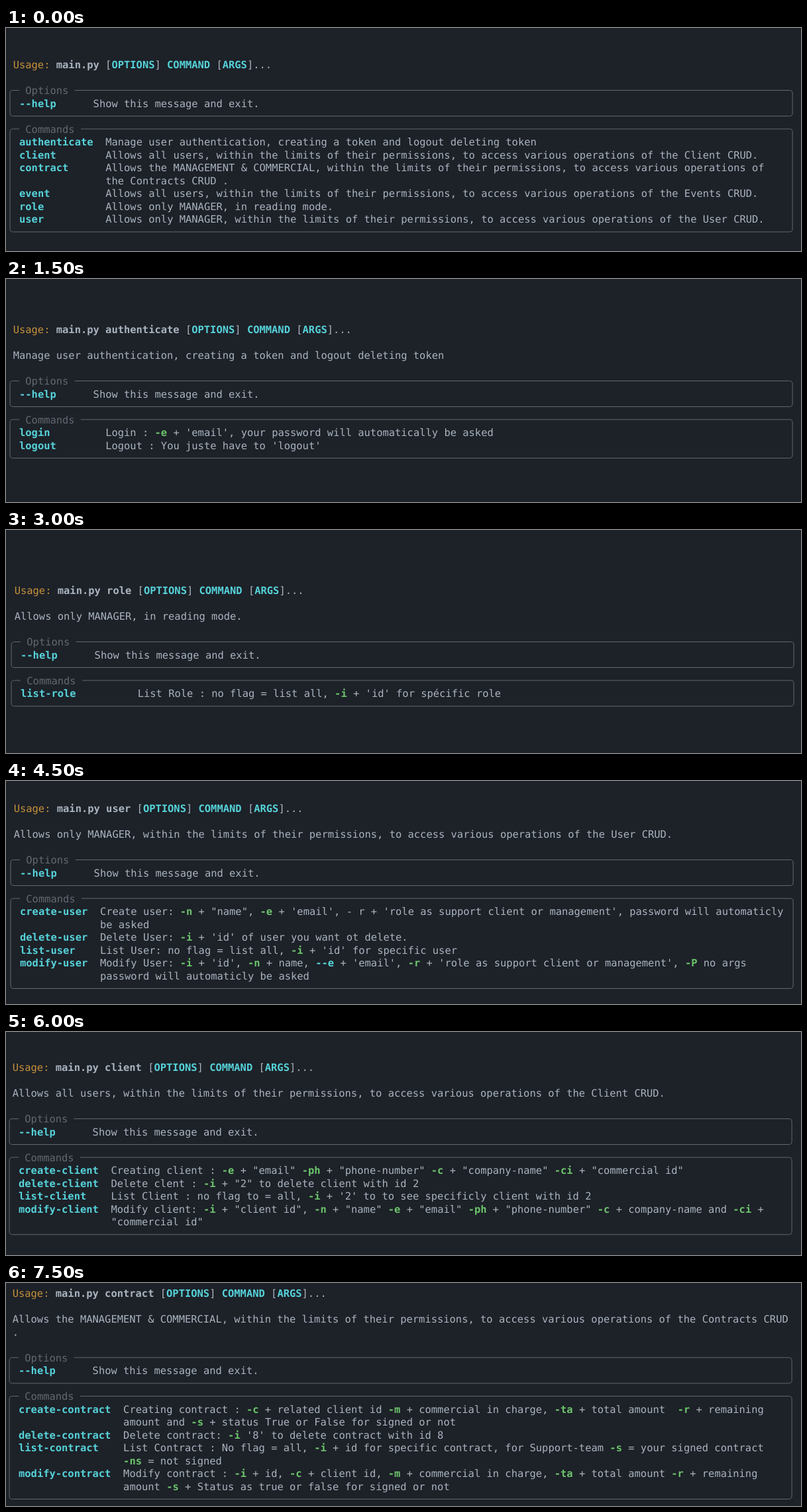
Animation of 1200 by 338 pixels, one loop 8000 ms. Source, as an HTML page:

```html
<!DOCTYPE html>
<html lang="en">
<head>
<meta charset="utf-8">
<title>Command line help</title>
<style>
html, body { margin: 0; height: 100%; overflow: hidden; background: #1d2128; }
svg { display: block; }
text { font: 15.448px "DejaVu Sans Mono", monospace; fill: #a9b4bf; white-space: pre; text-rendering: geometricPrecision; }
path { fill: none; stroke: #626971; }
.bold, .cyan, .green { font-weight: bold; }
.cyan { fill: #56d2d9; }
.green { fill: #6cc46c; }
.amber { fill: #c5913a; }
.dim { fill: #626971; }
</style>
</head>
<body>
<svg id="stage" width="1200" height="338"></svg>
<script>
const CELL = 9.3, ROW = 19.5, COLS = 127, STEP = 1500, LOOP = 8000;
const OPTIONS = [['--help', 'Show this message and exit.']];
const limits = 'within the limits of their permissions, to access various operations of';

// x, y: left edge of column 0 and middle of row 0; col: column of the descriptions
const scenes = [
  { x: 1.4, y: 56, cmd: 'main.py', about: [], col: 16, list: [
    ['authenticate', 'Manage user authentication, creating a token and logout deleting token'],
    ['client', `Allows all users, ${limits} the Client CRUD.`],
    ['contract', `Allows the MANAGEMENT & COMMERCIAL, ${limits}`, 'the Contracts CRUD .'],
    ['event', `Allows all users, ${limits} the Events CRUD.`],
    ['role', 'Allows only MANAGER, in reading mode.'],
    ['user', `Allows only MANAGER, ${limits} the User CRUD.`]] },
  { x: 1.4, y: 77, cmd: 'main.py authenticate', col: 16,
    about: ['Manage user authentication, creating a token and logout deleting token'], list: [
    ['login', "Login : -e + 'email', your password will automatically be asked"],
    ['logout', "Logout : You juste have to 'logout'"]] },
  { x: 3.4, y: 92, cmd: 'main.py role', col: 21,
    about: ['Allows only MANAGER, in reading mode.'], list: [
    ['list-role', "List Role : no flag = list all, -i + 'id' for spécific role"]] },
  { x: 2.4, y: 42, cmd: 'main.py user', col: 15,
    about: [`Allows only MANAGER, ${limits} the User CRUD.`], list: [
    ['create-user', `Create user: -n + "name", -e + 'email', - r + 'role as support client or management', password will automaticly`, 'be asked'],
    ['delete-user', "Delete User: -i + 'id' of user you want ot delete."],
    ['list-user', "List User: no flag = list all, -i + 'id' for specific user"],
    ['modify-user', "Modify User: -i + 'id', -n + name, --e + 'email', -r + 'role as support client or management', -P no args", 'password will automaticly be asked']] },
  { x: 0.4, y: 54, cmd: 'main.py client', col: 17,
    about: [`Allows all users, ${limits} the Client CRUD.`], list: [
    ['create-client', 'Creating client : -e + "email" -ph + "phone-number" -c + "company-name" -ci + "commercial id"'],
    ['delete-client', 'Delete clent : -i + "2" to delete client with id 2'],
    ['list-client', "List Client : no flag to = all, -i + '2' to to see specificly client with id 2"],
    ['modify-client', 'Modify client: -i + "client id", -n + "name" -e + "email" -ph + "phone-number" -c + company-name and -ci +', '"commercial id"']] },
  { x: 0.4, y: 16, cmd: 'main.py contract', col: 19,
    about: [`Allows the MANAGEMENT & COMMERCIAL, ${limits} the Contracts CRUD`, '.'], list: [
    ['create-contract', 'Creating contract : -c + related client id -m + commercial in charge, -ta + total amount  -r + remaining', 'amount and -s + status True or False for signed or not'],
    ['delete-contract', "Delete contract: -i '8' to delete contract with id 8"],
    ['list-contract', 'List Contract : No flag = all, -i + id for specific contract, for Support-team -s = your signed contract', '-ns = not signed'],
    ['modify-contract', 'Modify contract : -i + id, -c + client id, -m + commercial in charge, -ta + total amount -r + remaining', 'amount -s + Status as true or false for signed or not']] }
];

const span = (style, s) => `<tspan class="${style}">${s}</tspan>`;
const paintFlags = s => s.replace('&', '&amp;').replace(/(^|\s)(--?[a-z]+)/gi,
  (_, gap, flag) => gap + span(flag.startsWith('--') ? 'cyan' : 'green', flag));

function draw({ x, y, cmd, about, col, list }) {
  let out = '', row = 0;
  const px = c => x + c * CELL;
  const line = r => y + r * ROW - 0.5;
  const put = (c, r, s) => out += `<text x="${px(c)}" y="${y + r * ROW + 5}">${s}</text>`;

  function panel(title, items, descCol) {
    const top = line(row), left = px(0.5), right = px(COLS + 0.5), k = 4.5;
    put(3, row++, span('dim', title));
    for (const [name, ...lines] of items) {
      put(2, row, span('cyan', name));
      for (const s of lines) put(descCol, row++, paintFlags(s));
    }
    const bottom = line(row++);
    out += `<path d="M${px(2)} ${top}H${left + k}q${-k} 0 ${-k} ${k}V${bottom - k}q0 ${k} ${k} ${k}` +
      `H${right - k}q${k} 0 ${k} ${-k}V${top + k}q0 ${-k} ${-k} ${-k}H${px(title.length + 4)}"/>`;
  }

  put(1, row, `${span('amber', 'Usage:')} ${span('bold', cmd)} [${span('cyan', 'OPTIONS')}] ` +
    `${span('cyan', 'COMMAND')} [${span('cyan', 'ARGS')}]...`);
  row += 2;
  for (const s of about) put(1, row++, paintFlags(s));
  if (about.length) row++;
  panel('Options', OPTIONS, 14);
  panel('Commands', list, col);
  return `<g>${out}</g>`;
}

const stage = document.getElementById('stage');
stage.innerHTML = scenes.map(draw).join('');
const groups = [...stage.children];

function tick() {
  const now = Math.floor(performance.now() % LOOP / STEP);
  groups.forEach((g, i) => g.style.display = i === now ? '' : 'none');
  requestAnimationFrame(tick);
}
tick();
</script>
</body>
</html>
```
